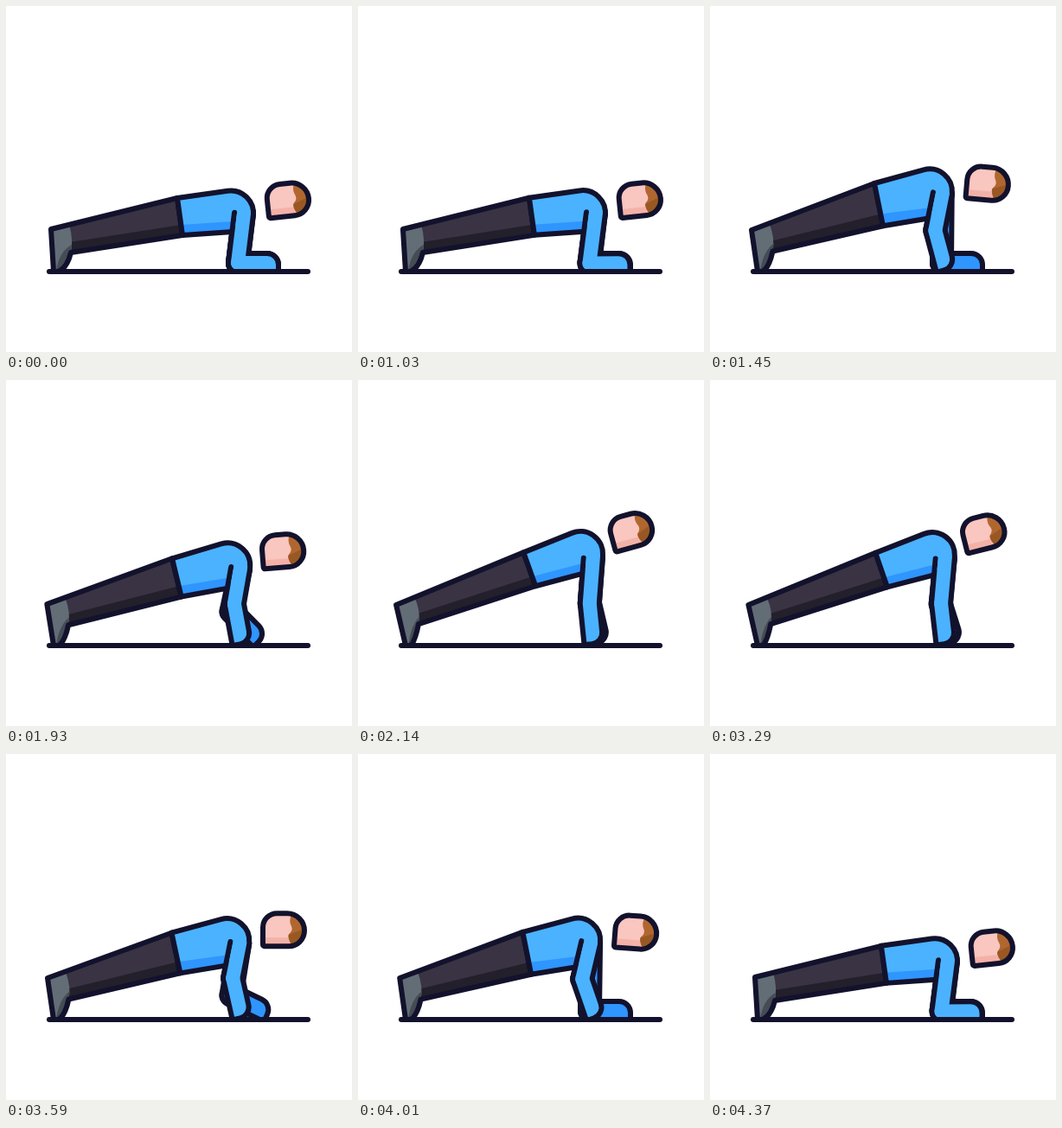
These frames come from a looping animation (400 by 400 pixels, 4.4 s). An HTML page with a canvas:

```html
<!DOCTYPE html>
<html>
<head>
<meta charset="utf-8">
<style>
html, body { margin: 0; height: 100%; overflow: hidden; background: #fff; }
canvas { display: block; }
</style>
</head>
<body>
<canvas id="stage" width="400" height="400"></canvas>
<script>
const ctx = document.getElementById('stage').getContext('2d');
const LOOP = 4400, MIRROR = 2700, FLOOR = 307, LINE = 6, HALF = 11, FOREARM = 47;
const ink = '#12122d', shirt = '#4bb2ff', shirtShade = '#2f95ff';

const mix = (a, b, s) => a + (b - a) * s;
const mixPoint = ([ax, ay], [bx, by], s) => [mix(ax, bx, s), mix(ay, by, s)];
const radians = deg => deg * Math.PI / 180;

function ease(t, from, to) {
  const s = Math.min(Math.max((t - from) / (to - from), 0), 1);
  return s * s * (3 - 2 * s);
}

function poly(...points) {
  const path = new Path2D();
  for (const [x, y] of points) path.lineTo(x, y);
  return path;
}

function fill(path, color) {
  ctx.fillStyle = color;
  ctx.fill(path);
}

function outline(path, width = LINE, color = ink) {
  ctx.lineWidth = width;
  ctx.strokeStyle = color;
  ctx.stroke(path);
}

function placed(x, y, angle, paint) {
  ctx.save();
  ctx.translate(x, y);
  ctx.rotate(radians(angle));
  paint();
  ctx.restore();
}

// First the near hand is planted, then the far one, then the body is pushed up.
function poseAt(t) {
  const near = ease(t, 1000, 1450), far = ease(t, 1520, 2340);
  const rise = (near + ease(t, 1850, 2170)) / 2;
  const lean = near - far;
  const at = (low, high, sway = [0, 0]) => {
    const [x, y] = mixPoint(low, high, rise);
    return [x + sway[0] * lean, y + sway[1] * lean];
  };
  const up = [-5, -6], down = [-5, 3];

  function bentArm(planted, bend) {
    const [x, y] = mixPoint([315, 297], [272.5, 305], planted);
    const angle = 90 * planted - bend;
    const elbow = [x - FOREARM * Math.cos(radians(angle)), y - FOREARM * Math.sin(radians(angle))];
    return { elbow, angle };
  }

  return {
    heel: at([52, 258], [44, 260]),
    ankle: at([75, 285], [70, 282]),
    waist: at([198, 222], [192, 200], up),
    hip: at([204, 265], [206, 237.5], down),
    corner: at([290, 209], [286, 162], up),
    armpit: at([262, 261], [262, 222.5], down),
    shoulder: at([275, 240], [272.5, 207], up),
    head: at([326, 224], [316, 172.5], [0, 7]),
    headAngle: mix(-6, -18, rise) + 17 * lean,
    nearArm: bentArm(near, 15 * Math.sqrt(lean)),
    farArm: bentArm(far, 0)
  };
}

// An arm silhouette, grown outwards by g.
function drawArm(shoulder, { elbow, angle }, g, color) {
  const w = HALF + g;
  outline(poly(shoulder, elbow), 2 * w, color);
  placed(...elbow, angle, () => {
    const forearm = new Path2D();
    forearm.roundRect(-w, -w, FOREARM + w + g, 2 * w, [w, 13 + g, Math.max(0, g), w]);
    fill(forearm, color);
  });
}

function drawLeg({ heel, waist, hip, ankle }) {
  const [bx, by] = ankle;
  const addFoot = path => {
    path.quadraticCurveTo(bx - 4, 302, 61, FLOOR);
    path.lineTo(55, FLOOR);
    path.closePath();
  };
  const leg = poly(heel, waist, hip, ankle);
  addFoot(leg);
  fill(leg, '#3a3344');
  fill(poly([bx - 1, by - 12], mixPoint(hip, waist, .28), hip, ankle), '#231f2b');

  const shoe = poly(heel, mixPoint(heel, waist, .145));
  shoe.quadraticCurveTo(bx + 3, by - 14, bx, by);
  addFoot(shoe);
  fill(shoe, '#636d76');

  const sole = poly([bx + 1, by - 9]);
  sole.quadraticCurveTo(61, 284, 58, FLOOR);
  sole.lineTo(61, FLOOR);
  sole.quadraticCurveTo(bx - 4, 302, bx, by);
  fill(sole, '#454c55');
  outline(leg);
}

function drawBody({ waist, hip, corner, armpit, shoulder, nearArm }) {
  const [sx, sy] = shoulder, [ex, ey] = nearArm.elbow;
  const scale = HALF / Math.hypot(ex - sx, ey - sy);
  const nx = (ey - sy) * scale, ny = (sx - ex) * scale;
  const torso = poly(waist);
  torso.arcTo(...corner, sx + nx, sy + ny, 26);
  torso.lineTo(sx + nx, sy + ny);
  torso.lineTo(...armpit);
  torso.lineTo(...hip);
  torso.closePath();

  drawArm(shoulder, nearArm, LINE / 2, ink);
  fill(torso, shirt);
  const hem = [armpit[0], armpit[1] - 12];
  fill(poly(mixPoint(hip, waist, .28), hem, armpit, hip), shirtShade);
  outline(torso);
  outline(poly([sx - nx, sy - ny], [ex - nx, ey - ny]));
  drawArm(shoulder, nearArm, -LINE / 2, shirt);
}

function drawHead({ head, headAngle }) {
  placed(...head, headAngle, () => {
    const skull = new Path2D();
    skull.roundRect(-24, -19, 48, 38, [17, 21, 19, 2]);
    fill(skull, '#f9c6c0');
    ctx.save();
    ctx.clip(skull);
    fill(poly([-24, 9], [24, 9], [24, 20], [-24, 20]), '#f4b1a7');
    const hair = poly([10, -20]);
    hair.quadraticCurveTo(5, -11, 9, -4);
    hair.quadraticCurveTo(11, 1, 6, 5);
    hair.quadraticCurveTo(4, 10, 11, 20);
    hair.lineTo(26, 20);
    hair.lineTo(26, -20);
    fill(hair, '#b0672f');
    ctx.clip(hair);
    fill(poly([0, 8], [26, -2], [26, 20], [0, 20]), '#995823');
    ctx.restore();
    outline(skull);
  });
}

function draw(now) {
  const clock = now % LOOP;
  const pose = poseAt(Math.min(clock, 2 * MIRROR - clock));

  ctx.fillStyle = '#fff';
  ctx.fillRect(0, 0, 400, 400);
  ctx.lineCap = ctx.lineJoin = 'round';

  // Nothing reaches below the floor.
  ctx.save();
  ctx.beginPath();
  ctx.rect(0, 0, 400, FLOOR);
  ctx.clip();
  drawArm(pose.shoulder, pose.farArm, LINE / 2, ink);
  drawArm(pose.shoulder, pose.farArm, -LINE / 2, shirtShade);
  drawLeg(pose);
  drawBody(pose);
  drawHead(pose);
  ctx.restore();
  outline(poly([50, FLOOR], [349, FLOOR]));
}

const start = performance.now();
function frame() {
  draw(performance.now() - start);
  requestAnimationFrame(frame);
}
frame();
</script>
</body>
</html>
```
